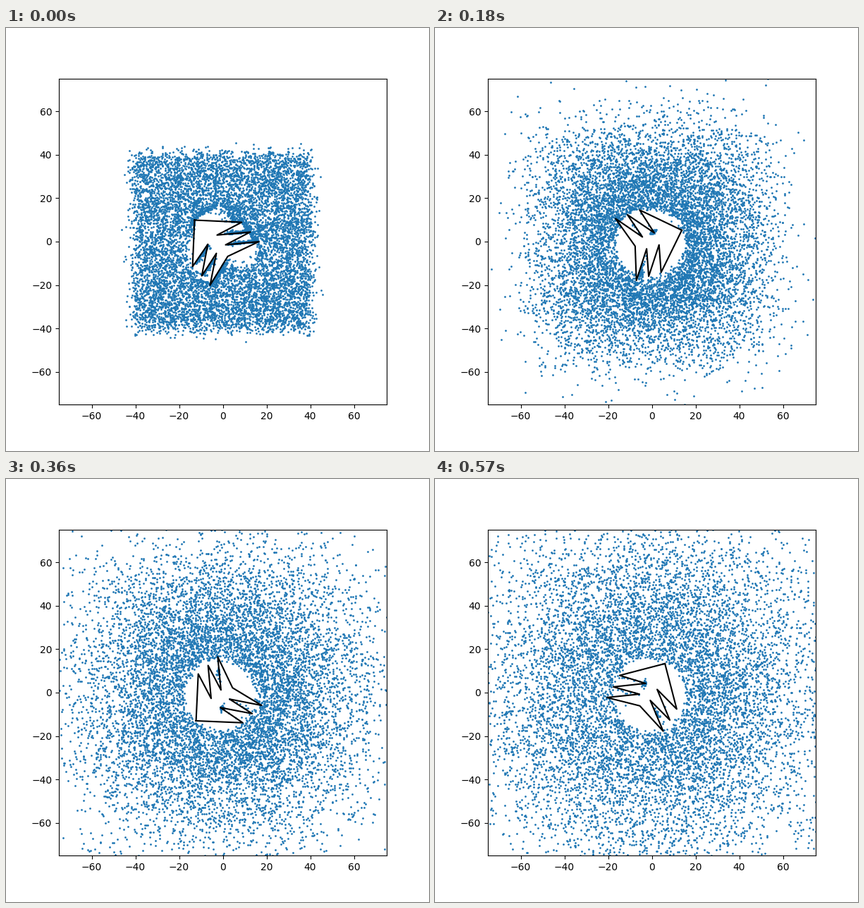
A matplotlib script that plays this animation: 600 by 600 pixels, repeating every 0.6 s.

```python
import numpy as np
import matplotlib.pyplot as plt
from matplotlib.animation import FuncAnimation
from matplotlib.path import Path

FRAMES, INTERVAL = 20, 30
COUNT, HALF, LIMIT = 10000, 40, 75
SPEED, DAMPING = 2.3, 0.95
SUBSTEPS = 60
PIVOT = -1.13 - 1.19j
REACH = 20.5

# Rotor outline at angle 0, relative to the pivot.
ROTOR = np.array([
    -11.8 + 11.1j, 9.8 + 10.1j, -1.5 + 4.2j, 13.7 + 5.6j, 2.4 - 0.3j,
    17.7 + 1.2j, 3.4 - 5.6j, -4.7 - 18.9j, -1.8 - 4.2j, -8.5 - 14.6j,
    -5.7 + 0.0j, -12.7 - 10.3j])
EDGES = np.roll(ROTOR, -1) - ROTOR
SHAPE = Path(np.column_stack([ROTOR.real, ROTOR.imag]))

# The rotor is spun up counter-clockwise by the gas, then slowly loses speed.
SPIN_STEP = [-1, 0, 4, 8, 12, 14, 16, 19]
SPIN_DEG = [-50, 0, 358.5, 854.8, 1530, 1801.2, 2062.4, 2447.1]


def turn(step):
    return np.exp(1j * np.radians(np.interp(step, SPIN_STEP, SPIN_DEG)))


def dot(a, b):
    return (a * b.conjugate()).real


def push_out(pos, vel, rot, rng):
    """Move particles inside the rotor past its nearest wall and bounce them."""
    near = np.flatnonzero(np.abs(pos - PIVOT) < REACH)
    local = (pos[near] - PIVOT) / rot
    hit = SHAPE.contains_points(np.column_stack([local.real, local.imag]))
    if not hit.any():
        return
    near, local = near[hit], local[hit]
    rel = local[:, None] - ROTOR
    along = np.clip(dot(rel, EDGES) / np.abs(EDGES) ** 2, 0, 1)
    walls = ROTOR + along * EDGES
    nearest = np.abs(local[:, None] - walls).argmin(axis=1)
    wall = walls[np.arange(len(local)), nearest]
    normal = (wall - local) / (np.abs(wall - local) + 1e-9)
    gap = rng.exponential(0.5, len(local))
    pos[near] = PIVOT + (wall + gap * normal) * rot
    normal = normal * rot
    speed = dot(vel[near], normal)
    vel[near] -= 2 * np.minimum(speed, 0) * normal


def simulate():
    rng = np.random.default_rng(4)
    pos = rng.uniform(-HALF, HALF, COUNT) + 1j * rng.uniform(-HALF, HALF, COUNT)
    vel = SPEED * (rng.normal(size=COUNT) + 1j * rng.normal(size=COUNT))
    history = []
    for frame in range(FRAMES):
        for sub in range(1, SUBSTEPS + 1):
            pos += vel / SUBSTEPS
            push_out(pos, vel, turn(frame - 1 + sub / SUBSTEPS), rng)
        vel *= DAMPING
        history.append(pos.copy())
    return history


history = simulate()

fig, ax = plt.subplots(figsize=(6, 6), dpi=100)
ax.set_xlim(-LIMIT, LIMIT)
ax.set_ylim(-LIMIT, LIMIT)
gas, = ax.plot([], [], "o", color="tab:blue", markersize=1)
rotor, = ax.plot([], [], color="black", linewidth=1.5)


def draw(frame):
    pos = history[frame]
    outline = PIVOT + np.append(ROTOR, ROTOR[0]) * turn(frame)
    gas.set_data(pos.real, pos.imag)
    rotor.set_data(outline.real, outline.imag)
    return gas, rotor


anim = FuncAnimation(fig, draw, frames=FRAMES, interval=INTERVAL,
                     repeat=True, repeat_delay=0)
plt.show()
```
